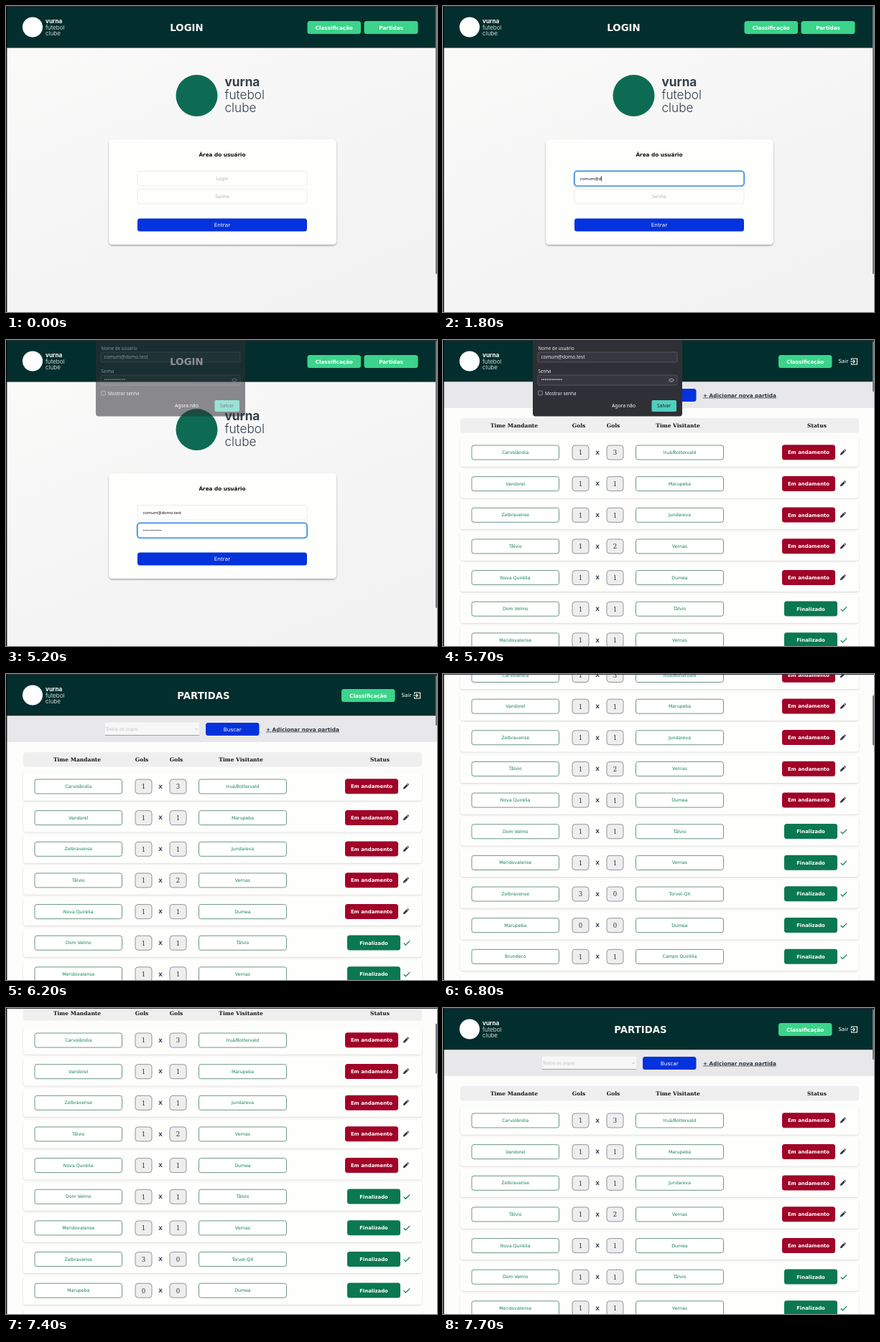
Animation, 600 px wide and 427 px high, one loop 8 s. Source, as an HTML page:

```html
<!DOCTYPE html>
<html lang="pt-BR">
<head>
<meta charset="utf-8">
<title>Futebol clube</title>
<style>
html, body { margin: 0; width: 100%; height: 100%; overflow: hidden; background: #fdfdfc; }
svg { display: block; width: 600px; height: 427px; }
text { font-family: "DejaVu Sans", sans-serif; white-space: pre; }
.serif { font-family: "DejaVu Serif", serif; }
.field { font-family: "Noto Sans", sans-serif; }
.brand { font-family: Inter, sans-serif; }
.b { font-weight: 700; }
.light { font-weight: 300; }
.mid { text-anchor: middle; }
</style>
</head>
<body>
<svg id="stage" viewBox="0 0 600 427" xmlns="http://www.w3.org/2000/svg"></svg>
<script>
const LOOP = 8000, STEP = 100, ROW = 43.65;
const EMAIL = 'comum@domo.test';
const emailKeys = [1500, 1700, 1700, 1700, 1800, 1800, 1800, 1900, 2000, 2100, 2200, 2500, 2600, 2800, 2900];
const passKeys = [3300, 3400, 3600, 3700, 3800, 3900, 4300, 4400, 4500, 4600, 4700, 4700];
const FOCUS_EMAIL = 1200, FOCUS_PASS = 3100, POPUP_IN = 5200, ENTER = 5300, POPUP_OUT = 5900, POPUP_GONE = 6000;
const SCROLL_START = 6600, SCROLL_TURN = 7200, SCROLL_END = 7700, SCROLL_MAX = 311;

const games = [
  ['Carvolândia', 1, 3, 'Iruá/Boltervald'],
  ['Vandorel', 1, 1, 'Marupeba'],
  ['Zelbravense', 1, 1, 'Jundareva'],
  ['Tâlvio', 1, 2, 'Vernas'],
  ['Nova Quirélia', 1, 1, 'Dumea'],
  ['Dom Velmo', 1, 1, 'Tâlvio'],
  ['Meridovalense', 1, 1, 'Vernas'],
  ['Zelbravense', 3, 0, 'Torvel-QX'],
  ['Marupeba', 0, 0, 'Dumea'],
  ['Brundeco', 1, 1, 'Campo Quirélia'],
  ['Vandorel', 1, 1, 'Nova Quirélia'],
  ['Jundareva', 2, 2, 'Carvolândia'],
  ['Dom Rulé-QZ', 0, 1, 'Iruá/Boltervald'],
  ['Iruá/Boltervald', 0, 3, 'Jundareva']
];

const text = (x, y, s, size, fill, cls = '', more = '') =>
  `<text x="${x}" y="${y}" font-size="${size}" fill="${fill}" class="${cls}" ${more}>${s}</text>`;
const rect = (x, y, w, h, r, fill, more = '') =>
  `<rect x="${x}" y="${y}" width="${w}" height="${h}" rx="${r}" fill="${fill}" ${more}/>`;
const button = (x, y, w, h, fill, label, size = 7.2, cls = 'b') =>
  rect(x, y, w, h, 3.5, fill) + text(x + w / 2, y + h / 2 + 2.5, label, size, '#fff', 'mid ' + cls);

function brand(x, y, size, gap, fill) {
  return ['vurna', 'futebol', 'clube'].map((word, i) =>
    text(x, y + i * gap, word, size, fill, 'brand ' + (i ? 'light' : 'b'))).join('');
}

function header(title, x) {
  return rect(0, 0, 600, 58.5, 0, '#022e2d') +
    '<circle cx="37" cy="29.5" r="14" fill="#fff"/>' +
    brand(55, 24, 8.2, 8.5, '#fff') +
    text(x, 35, title, 13.3, '#f4f7f6', 'mid b');
}

function loginPage() {
  const box = y => rect(183, y, 236, 20.5, 3.5, '#fefefd', 'stroke="#e9e9e9" stroke-width=".8"');
  const ring = (id, y) => `<g id="${id}">` +
    rect(182.3, y - .7, 237.4, 22, 4.5, 'none', 'stroke="#b8d8f6" stroke-width="2"') +
    rect(183, y, 236, 20.5, 4, '#fff', 'stroke="#1273cf" stroke-width="1.2"') + '</g>';
  return rect(0, 0, 600, 427, 0, 'url(#paper)') +
    header('LOGIN', 251.5) +
    button(419.5, 21, 74.5, 18, '#3bd48a', 'Classificação') +
    button(498.5, 21, 75, 18, '#3bd48a', 'Partidas') +
    '<circle cx="265.5" cy="125" r="29" fill="#0d6b54"/>' +
    brand(304.5, 112, 17.2, 18, '#333f4a') +
    rect(143, 186, 317, 147, 5, '#fefefd', 'filter="url(#shade)"') +
    text(301, 209.8, 'Área do usuário', 7.3, '#111', 'mid b') +
    box(230.5) + box(255.5) + ring('ringEmail', 230.5) + ring('ringPass', 255.5) +
    text(301, 243.2, 'Login', 6.35, '#b4b4b6', 'mid', 'id="hintEmail"') +
    text(301, 267.9, 'Senha', 6.35, '#b4b4b6', 'mid', 'id="hintPass"') +
    text(190.5, 243, '', 5.8, '#111', 'field', 'id="email"') +
    text(190.5, 268, '', 5.8, '#111', 'field', 'id="pass"') +
    rect(0, 0, .7, 7.5, 0, '#111', 'id="caret"') +
    button(183, 296.5, 236, 18, '#0432dc', 'Entrar', 7.25, '') +
    rect(598, 1, 2, 373, 1, '#77777b');
}

function gameRow([home, a, b, away], i) {
  const y = 157 + i * ROW, live = i < 5;
  const team = (x, w, name) =>
    rect(x, y - 10, w, 20, 3, '#fefffe', 'stroke="#5c8b7b" stroke-width=".9"') +
    text(x + w / 2, y + 2, name, 6.2, '#14805a', 'mid');
  const score = (x, n) =>
    rect(x, y - 10, 23, 20, 4, '#eeeeef', 'stroke="#868b90" stroke-width=".9"') +
    text(x + 11.5, y + 3.4, n, 8.6, '#333', 'mid serif');
  const pencil = `<path transform="translate(556.5 ${y}) rotate(45)" d="M-1.4 -3.2h2.8v6.2l-1.4 2.2l-1.4 -2.2zM-1.4 -5.2h2.8v1.3h-2.8z" fill="#2f3a48"/>`;
  const check = `<path d="M553.7 ${y + .3}l2.7 2.7l5.8 -5.8" fill="none" stroke="#0a7850" stroke-width="1.2"/>`;
  return rect(24, y - 20, 555, 39.5, 4, '#fefefd', 'filter="url(#soft)"') +
    team(40, 121.5, home) + score(180, a) +
    text(215, y + 2.7, 'X', 7.3, '#34435b', 'mid b') +
    score(228, b) + team(268.5, 122, away) +
    (live ? button(472, y - 10.7, 74, 21, '#a10328', 'Em andamento', 6.9) + pencil
          : button(475, y - 10.7, 74, 21, '#0a7850', 'Finalizado', 6.9) + check);
}

function gamesPage() {
  const heads = [[99, 'Time Mandante'], [189, 'Gols'], [237, 'Gols'], [327, 'Time Visitante'], [520.5, 'Status']];
  return rect(0, 0, 600, 427, 0, '#fdfdfc') + '<g id="content">' +
    header('PARTIDAS', 275) +
    button(467, 21, 74.5, 18, '#3bd48a', 'Classificação') +
    text(550.5, 32.3, 'Sair', 7.25, '#fff') +
    '<path d="M568.5 28v-2h8v8h-8v-2M567 30h6M571 27.7l2.3 2.3l-2.3 2.3" fill="none" stroke="#fff" stroke-width="1.1"/>' +
    rect(0, 58.5, 600, 36.5, 0, '#e8e8ea') +
    rect(138, 67.5, 131, 18, 1, '#f7f7f7') + rect(138, 85, 131, .9, 0, '#98989c') +
    text(138.5, 79, 'Todos os jogos', 6.2, '#c2c2c4') +
    '<path d="M263.3 75.8l1.8 1.8l1.8 -1.8" fill="none" stroke="#aaa" stroke-width=".8"/>' +
    button(278, 68, 74.5, 18, '#0432dc', 'Buscar', 7.3, '') +
    text(362, 79.6, '+ Adicionar nova partida', 7.26, '#2c3541', 'b', 'text-decoration="underline"') +
    rect(24, 109, 555, 20.5, 4, '#efeff0') +
    heads.map(([x, s]) => text(x, 121.7, s, 7.5, '#151515', 'mid serif b')).join('') +
    games.map(gameRow).join('') + '</g>' +
    rect(598, 2, 2, 70, 1, '#77777b', 'id="thumb"');
}

function popup() {
  const ink = '#e9e9ee';
  const box = y => rect(132, y, 194, 14, 2, '#38373f', 'stroke="#6a6973" stroke-width=".6"');
  return rect(125, -6, 208, 112.5, 4, '#2f2f36') +
    text(132.5, 13.5, 'Nome de usuário', 6.2, ink, 'field') + box(17) +
    text(136.5, 26.3, EMAIL, 6.6, ink, 'field') +
    text(132.5, 45.5, 'Senha', 6.2, ink, 'field') + box(49) +
    text(136.5, 58.3, '•'.repeat(12), 6.6, ink, 'field') +
    `<path d="M314.5 56q3.5 -4 7 0q-3.5 4 -7 0z" fill="none" stroke="${ink}" stroke-width=".7"/>` +
    rect(132.5, 71, 6, 6, 1, '#38373f', 'stroke="#a0a0a8" stroke-width=".7"') +
    text(142, 76.6, 'Mostrar senha', 6.4, ink, 'field') +
    text(251.5, 94.3, 'Agora não', 6.8, '#fff', 'field mid') +
    rect(290.5, 84, 34.5, 16, 2, '#4fd0bd') +
    text(307.7, 94.3, 'Salvar', 6.8, '#23232b', 'field mid');
}

document.getElementById('stage').innerHTML = `
<defs>
  <linearGradient id="paper" x1="0" y1="0" x2=".6" y2="1">
    <stop offset="0" stop-color="#fbfbfa"/><stop offset="1" stop-color="#f2f2f3"/>
  </linearGradient>
  <filter id="shade" x="-5%" y="-5%" width="110%" height="115%">
    <feDropShadow dx="0" dy="1.4" stdDeviation="1.3" flood-color="#000" flood-opacity=".35"/>
  </filter>
  <filter id="soft" x="-2%" y="-10%" width="104%" height="130%">
    <feDropShadow dx="0" dy="1" stdDeviation=".9" flood-color="#000" flood-opacity=".16"/>
  </filter>
</defs>
<g id="login">${loginPage()}</g>
<g id="games">${gamesPage()}</g>
<g id="popup">${popup()}</g>
${rect(0, 0, 600, 1, 0, '#2c2e36')}${rect(0, 0, 1.4, 427, 0, '#0c0c0e')}`;

const el = {};
document.querySelectorAll('#stage [id]').forEach(n => el[n.id] = n);
const show = (node, on) => node.style.display = on ? '' : 'none';
const typed = (keys, t) => keys.filter(k => k <= t).length;

function scrollAt(t) {
  if (t <= SCROLL_START || t >= SCROLL_END) return 0;
  if (t <= SCROLL_TURN)
    return SCROLL_MAX * Math.sin((t - SCROLL_START) / (SCROLL_TURN - SCROLL_START) * Math.PI / 2);
  return SCROLL_MAX * ((SCROLL_END - t) / (SCROLL_END - SCROLL_TURN)) ** 2;
}

function drawCaret(t, onPass) {
  const field = onPass ? el.pass : el.email;
  const keys = onPass ? passKeys : emailKeys;
  const n = typed(keys, t);
  const last = n ? keys[n - 1] : onPass ? FOCUS_PASS : FOCUS_EMAIL;
  show(el.caret, t >= FOCUS_EMAIL && Math.floor((t - last) / 500) % 2 === 0);
  el.caret.setAttribute('x', 190.7 + (n ? field.getComputedTextLength() : 0));
  el.caret.setAttribute('y', onPass ? 262 : 237);
}

function drawLogin(t) {
  const onPass = t >= FOCUS_PASS, nEmail = typed(emailKeys, t), nPass = typed(passKeys, t);
  show(el.ringEmail, t >= FOCUS_EMAIL && !onPass);
  show(el.ringPass, onPass);
  show(el.hintEmail, !nEmail);
  show(el.hintPass, !nPass);
  el.email.textContent = EMAIL.slice(0, nEmail);
  el.pass.textContent = '•'.repeat(nPass);
  drawCaret(t, onPass);
}

function draw(t) {
  const inside = t >= ENTER;
  show(el.login, !inside);
  show(el.games, inside);
  if (inside) {
    const s = scrollAt(t);
    el.content.setAttribute('transform', `translate(0 ${-s})`);
    el.thumb.setAttribute('y', 2 + s * .177);
  } else drawLogin(t);
  show(el.popup, t >= POPUP_IN && t < POPUP_GONE);
  el.popup.setAttribute('opacity', t < ENTER ? .55 : t < POPUP_OUT ? 1 : .4);
}

const start = performance.now();
function tick() {
  const t = (performance.now() - start) % LOOP;
  draw(Math.floor(t / STEP) * STEP);
  requestAnimationFrame(tick);
}
tick();
</script>
</body>
</html>
```
